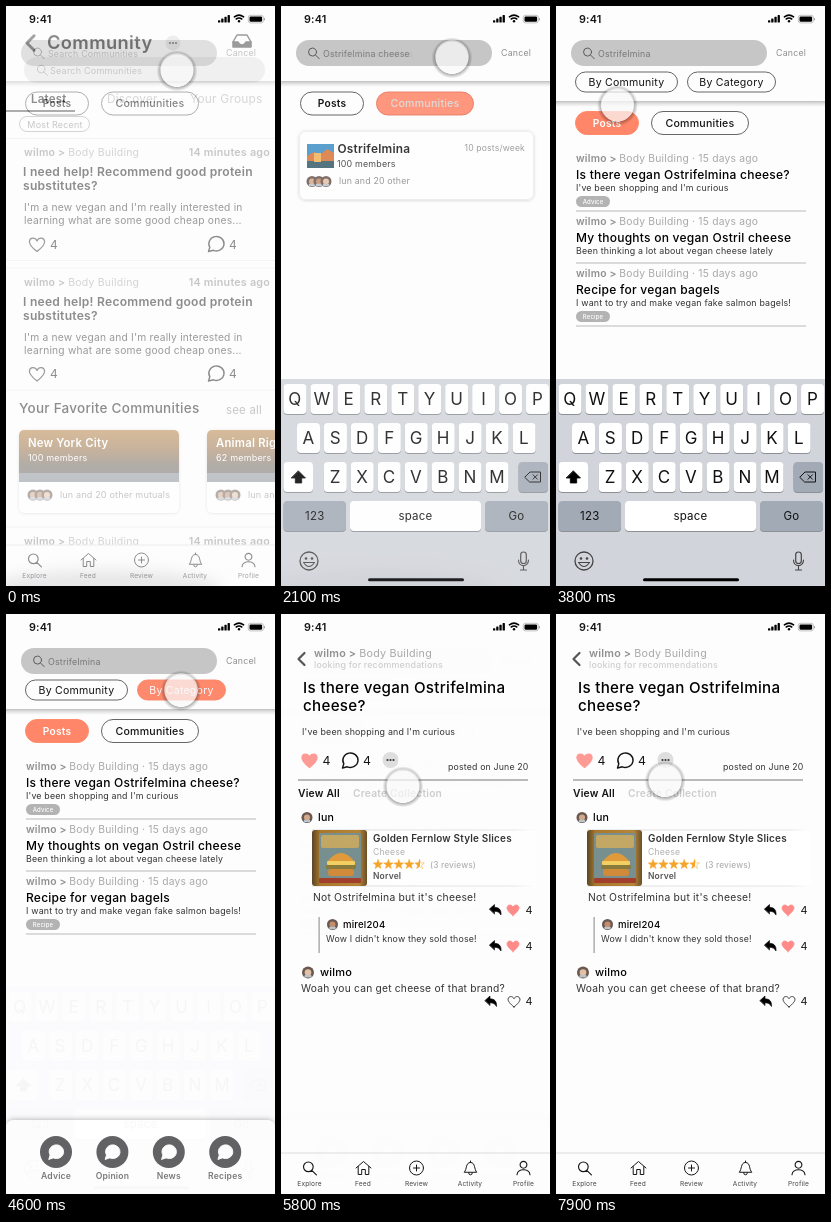
These frames come from a looping animation (269 px wide and 580 px high, 8000 ms). An HTML page:

```html
<!DOCTYPE html>
<html lang="en">
<head>
<meta charset="utf-8">
<title>Community search</title>
<style>
html, body { margin: 0; width: 100%; height: 100%; overflow: hidden; background: #fdfdfe; }
svg { display: block; width: 100vw; height: 100vh; }
text { font-family: Inter, "Open Sans", sans-serif; letter-spacing: .02em; white-space: pre; }
</style>
</head>
<body>
<svg id="stage" viewBox="0 0 269 580"></svg>
<script>
const CORAL = '#ff8668', INK = '#151515', GREY = '#8f8f8f', PALE = '#b0b0b0', BG = '#fdfdfe';
const LOOP = 8000, FADE = 300;

// Drawing helpers, each returns SVG markup
const text = (x, y, size, str, fill = INK, weight = 400, anchor = 'start') =>
  `<text x="${x}" y="${y}" font-size="${size}" fill="${fill}" font-weight="${weight}" text-anchor="${anchor}">${str}</text>`;
const rect = (x, y, w, h, fill, r = 0, extra = '') =>
  `<rect x="${x}" y="${y}" width="${w}" height="${h}" rx="${r}" fill="${fill}" ${extra}/>`;
const disc = (x, y, r, fill, extra = '') => `<circle cx="${x}" cy="${y}" r="${r}" fill="${fill}" ${extra}/>`;
const line = (x1, y, x2, color = '#b9b9b9', w = 1) =>
  `<path d="M${x1} ${y}H${x2}" stroke="${color}" stroke-width="${w}"/>`;
const shape = (x, y, d, fill = 'none', stroke = INK, w = 1.2, k = 1) =>
  `<path transform="translate(${x} ${y}) scale(${k})" d="${d}" fill="${fill}" stroke="${stroke}" stroke-width="${w}" stroke-linecap="round" stroke-linejoin="round"/>`;
const group = (x, y, body) => `<g transform="translate(${x} ${y})">${body}</g>`;
const glow = h => `<ellipse cx="98" cy="584" rx="118" ry="${h}" fill="#d4d4d6" filter="url(#blur)"/>`;

const HEART = 'M0 7C-5 3-8-.5-7.6-3.2C-7-7-2-7.6 0-3.6C2-7.6 7-7 7.6-3.2C8-.5 5 3 0 7Z';
const BUBBLE = 'M-7.5 7.5L-6.2 3.2A7.6 7.2 0 1 1-2.6 6.3Z';
const REPLY = 'M-6-.5L-1-5V-2.2C3.5-2.2 6 .5 5.5 5.5C4 2.8 2 1.8-1 1.8V4.2Z';
const CHEVRON = 'M3-6L-3 0L3 6';
const STAR = Array.from({ length: 10 }, (_, i) => {
  const a = (i / 5 - .5) * Math.PI, r = i % 2 ? 2.1 : 5;
  return (i ? 'L' : 'M') + (r * Math.cos(a)).toFixed(2) + ' ' + (r * Math.sin(a)).toFixed(2);
}).join('') + 'Z';

const heart = (x, y, fill, k = 1) => shape(x, y, HEART, fill, fill === 'none' ? '#333' : fill, 1.2, k);
const bubble = (x, y) => shape(x, y, BUBBLE, 'none', INK, 1.4);
const lens = (x, y, color, k = 1) => shape(x, y, 'M3.2-1A4.2 4.2 0 1 1-5.2-1A4.2 4.2 0 1 1 3.2-1M2 2L6 6', 'none', color, 1, k);
const avatar = (x, y, r, skin = '#d3a98a') =>
  disc(x, y, r, '#6b5850') + disc(x, y, r * .55, skin) + rect(x - r * .6, y + r * .4, r * 1.2, r * .45, '#b9c4cc', r * .2);
const avatars = (x, y) => avatar(x + 5, y, 5.5) + avatar(x + 12, y, 5.5, '#c58d6c') + avatar(x + 19, y, 5.5, '#e2c2a6');
const more = (x, y, r) => disc(x, y, r, '#dedede') + [-3, 0, 3].map(d => disc(x + d, y, 1.1, '#333')).join('');
const byline = (x, y, size, rest) =>
  text(x, y, size, `<tspan fill="${GREY}" font-weight="600">wilmo &gt; </tspan>${rest}`, '#a9a9a9');
const pill = (x, y, w, label, on, size = 10.6, weight = 500, h = 23) =>
  rect(x, y, w, h, on ? CORAL : BG, h / 2, `stroke="${on ? CORAL : '#555'}" stroke-width=".9"`) +
  text(x + w / 2, y + h / 2 + 3.8, size, label, on ? '#fff' : INK, weight, 'middle');

const blank = rect(0, 0, 269, 580, BG);

const statusBar = text(23, 17, 10.8, '9:41', INK, 600) +
  [0, 1, 2, 3].map(i => rect(212 + i * 3.2, 14.2 - i * 1.7, 2.3, 2.3 + i * 1.7, '#000', .6)).join('') +
  shape(233, 12, 'M-4.6-1.2Q0-4.6 4.6-1.2M-2.7 1Q0-1 2.7 1', 'none', '#000', 1.6) + disc(233, 15.2, 1.2, '#000') +
  rect(242.3, 9.3, 15, 7.6, 'none', 2.2, 'stroke="#999" stroke-width=".6"') +
  rect(243.5, 10.4, 12.6, 5.4, '#000', 1.3) + rect(258, 11.8, .9, 2.6, '#999', .4);

function tabBar() {
  const icons = [
    lens(28.5, 554, INK, 1.15),
    shape(82.5, 554, 'M-7.5 0L0-6.5L7.5 0M-5.3-1.5V6.5H-1.8V1.5H1.8V6.5H5.3V-1.5', 'none', INK, 1),
    shape(135.5, 554, 'M7 0A7 7 0 1 1-7 0A7 7 0 1 1 7 0M-3 0H3M0-3V3', 'none', INK, 1),
    shape(189.5, 554, 'M-6 4C-3.5 1.5-5-5.5 0-5.5S3.5 1.5 6 4ZM-1.8 5A1.8 1.8 0 0 0 1.8 5M0-7V-5.5', 'none', INK, 1),
    shape(242.5, 554, 'M3.4-3.2A3.4 3.4 0 1 1-3.4-3.2A3.4 3.4 0 1 1 3.4-3.2M-6.5 6.8C-6 0 6 0 6.5 6.8', 'none', INK, 1.1)
  ];
  return rect(0, 539, 269, 41, BG) + line(0, 539, 269, '#dcdcdc') + icons.join('') +
    ['Explore', 'Feed', 'Review', 'Activity', 'Profile']
      .map((s, i) => text(28.5 + i * 53.5, 572, 6.6, s, '#444', 400, 'middle')).join('');
}

function feed() {
  const post = y => group(0, y,
    line(0, 0, 269, '#ececec') + byline(18, 17.5, 10.5, 'Body Building') +
    text(264, 17.5, 10.75, '14 minutes ago', GREY, 600, 'end') +
    text(17, 37.5, 12.1, 'I need help! Recommend good protein', INK, 600) + text(17, 51.5, 12.1, 'substitutes?', INK, 600) +
    text(18, 72.5, 10.25, "I'm a new vegan and I'm really interested in", '#333') +
    text(18, 85.5, 10.25, 'learning what are some good cheap ones...', '#333') +
    heart(31, 106, 'none') + text(44, 110, 12, '4') + bubble(210, 105.5) + text(223, 110, 12, '4') +
    line(0, 122, 269, '#ececec'));
  const card = (x, name, count) => group(x, 424,
    rect(0, 0, 160, 83, '#fff', 6, 'filter="url(#soft)"') + rect(0, 0, 160, 52, 'url(#autumn)', 5) +
    rect(0, 43, 160, 9, '#7f8990') +
    text(9, 17, 11.3, name, '#fff', 600) + text(9, 31, 9, count, '#fff') +
    avatars(9, 65) + text(41, 68, 9, 'lun and 20 other mutuals', GREY));
  return blank + shape(24.5, 37, CHEVRON, 'none', '#444', 2.4, 1.2) + text(41, 43, 18.3, 'Community', INK, 600) + more(167, 37, 7.5) +
    shape(236, 35, 'M-9 1L-5-6H5L9 1', 'none', '#333', 1.5) +
    shape(236, 35, 'M-9 1H-4Q-3 4 0 4T4 1H9V6H-9Z', '#333', '#333', 1.5) +
    rect(18, 51, 241, 26, '#e4e4e4', 13) + lens(36, 64, GREY, .9) + text(44, 67.5, 9.1, 'Search Communities', GREY) +
    text(25, 97, 11.5, 'Latest', INK, 600) + text(101, 97, 11.8, 'Discover', PALE) + text(184, 97, 11.9, 'Your Groups', PALE) +
    line(0, 105, 69, '#222', 1.4) +
    rect(13.5, 110.5, 70, 15, BG, 7.5, 'stroke="#aaa"') + text(49, 121.5, 9, 'Most Recent', GREY, 400, 'middle') +
    post(132.5) + post(262) +
    text(13, 407, 13.5, 'Your Favorite Communities', INK, 500) + text(220, 408, 11.4, 'see all', GREY) +
    card(13, 'New York City', '100 members') + card(201, 'Animal Rights', '62 members') +
    post(521) + tabBar();
}

const searchBar = query => rect(15, 34, 196, 26, '#c7c6c7', 13) + lens(32.5, 47, '#555', .95) +
  text(42, 50.5, 8.9, query, '#777') + text(220, 50, 8.85, 'Cancel', GREY);
const header = (y, query) => rect(0, y, 269, 6, 'url(#fall)') + searchBar(query);
const kinds = (y, posts, groups) => pill(19.5, y, 63, 'Posts', posts, 10.2, 600) + pill(95.5, y, 97, 'Communities', groups);

function keyboard() {
  const key = (x, y, w, label, grey, size = 17) =>
    rect(x, y + 1, w, 30, '#8d9095', 4) + rect(x, y, w, 30, grey ? '#a2aab5' : '#fff', 4) +
    text(x + w / 2, y + 15 + size * .36, size, label, '#111', 400, 'middle');
  const row = (keys, x, y) => [...keys].map((c, i) => key(x + i * 26.95, y, 23, c)).join('');
  return rect(0, 373, 269, 207, '#d1d4da') +
    row('QWERTYUIOP', 2.5, 378) + row('ASDFGHJKL', 16, 417) + row('ZXCVBNM', 42.8, 456) +
    key(2.5, 456, 29.5, '') + shape(17.5, 471, 'M0-6L7 1H3.2V6H-3.2V1H-7Z', '#000', '#000', .8) +
    key(237.5, 456, 29.5, '', true) + shape(252, 471, 'M-8 0L-3-5H7.5V5H-3ZM0-2.2L4.4 2.2M4.4-2.2L0 2.2', 'none', INK, 1) +
    key(2.5, 495, 62.5, '123', true, 11.5) + key(69, 495, 131, 'space', false, 11.5) + key(204, 495, 63, 'Go', true, 11.5) +
    disc(28, 555, 9, 'none', 'stroke="#444" stroke-width="1.3"') + disc(25, 552.5, 1.3, '#444') + disc(31, 552.5, 1.3, '#444') +
    shape(28, 555, 'M-5.5 1.5Q0 9.5 5.5 1.5Z', 'none', '#444', 1.1) +
    rect(239.7, 546, 5.6, 11.5, 'none', 2.8, 'stroke="#444" stroke-width="1.2"') +
    shape(242.5, 555, 'M-5-1C-5 6.5 5 6.5 5-1M0 5V9M-3 9H3', 'none', '#444', 1.1) +
    rect(87, 572.3, 96, 3, '#000', 1.5);
}

const search = () => blank + glow(20) + header(75, 'Search Communities') + kinds(86, false, false);

const results = () => blank + header(75, 'Ostrifelmina cheese') + kinds(86, false, true) +
  rect(18.5, 125.5, 234, 68, '#fff', 6, 'stroke="#ececec" filter="url(#soft)"') +
  rect(26, 138, 27, 24, '#3f8fc4') + shape(26, 138, 'M0 12L7 8L13 11L20 5L27 9V24H0Z', '#d9763a', 'none') +
  rect(26, 155, 27, 7, '#375d6b') + rect(33, 147, 7, 9, '#f0b25a') +
  text(56.5, 147, 11.85, 'Ostrifelmina', INK, 600) + text(56, 161, 8.9, '100 members', '#333') +
  text(244, 145, 8.6, '10 posts/week', GREY, 400, 'end') +
  avatars(26, 175.5) + text(58, 178, 8.8, 'lun and 20 other', '#888') + keyboard();

function postList(byCategory) {
  const item = (y, title, sub, end, tag) => byline(20, y, 10.3, 'Body Building · 15 days ago') +
    text(20, y + 17.2, 12.03, title, '#000', 500) + text(20, y + 29, 8.85, sub, '#333') + line(20, end, 250) +
    (tag ? rect(20, end - 15, 34, 11, '#b3b3b3', 5.5) + text(37, end - 7.3, 6, tag, '#fff', 500, 'middle') : '');
  return blank + header(95, 'Ostrifelmina') + pill(19.5, 66, 102, 'By Community', false, 10.6, 400, 20) +
    pill(131.5, 66, 88, 'By Category', byCategory, 10.6, 400, 20) + kinds(105.5, true, false) +
    item(156, 'Is there vegan Ostrifelmina cheese?', "I've been shopping and I'm curious", 205, 'Advice') +
    item(219, 'My thoughts on vegan Ostril cheese', 'Been thinking a lot about vegan cheese lately', 257) +
    item(270.6, 'Recipe for vegan bagels', 'I want to try and make vegan fake salmon bagels!', 320, 'Recipe');
}

const category = () => postList(true) + rect(0, 506, 269, 90, '#fff', 8, 'filter="url(#lift)"') +
  ['Advice', 'Opinion', 'News', 'Recipes'].map((s, i) => {
    const x = 50 + i * 56.4;
    return disc(x, 538, 16, '#5f5f61') + shape(x, 538, BUBBLE, '#fff', '#fff', 1, .95) +
      text(x, 564.5, 8.6, s, '#777', 600, 'middle');
  }).join('');

// Soft stand-in for the product photo
const pack = () => rect(31, 216, 55, 56, 'url(#wood)', 3) + rect(38, 219, 42, 48, '#77908f', 2) +
  rect(40, 221, 38, 13, '#c2a765', 2) + shape(60, 248, 'M-13-1Q0-17 13-1Z', '#e09a3c', 'none') +
  rect(46, 247, 28, 4, '#f3cf62', 1) + rect(45, 251, 30, 4, '#8a7b3c', 1) + rect(47, 255, 26, 7, '#d08a3a', 3) +
  rect(38, 264, 42, 5, '#a23f2c', 1);

function post() {
  const votes = (x, y, fill) => shape(x, y, REPLY, '#000', '#000', .6) +
    heart(x + (fill === 'none' ? 23 : 17.5), y + .5, fill, .78) + text(244.5, y + 4, 10.8, '4');
  const stars = [0, 1, 2, 3, 4].map(i => shape(97 + i * 10.4, 250.5, STAR, i < 4 ? '#f5a42a' : 'url(#half)', '#f5a42a', .5)).join('');
  return blank + shape(20.5, 45, CHEVRON, 'none', '#555', 2.2) + byline(33, 43, 10.75, 'Body Building') +
    text(33, 53.8, 8.9, 'looking for recommendations', '#cfcfcf', 500) +
    text(22, 79, 15.15, 'Is there vegan Ostrifelmina', '#000', 500) + text(22, 96.5, 15.15, 'cheese?', '#000', 500) +
    text(21, 121, 8.9, "I've been shopping and I'm curious", '#333') +
    heart(28.5, 146.5, '#ff9a94') + text(41.5, 150.5, 12.3, '4') + bubble(69, 146.5) + text(82, 150.5, 12.3, '4') + more(109.5, 146, 8) +
    text(167, 155.5, 8.75, 'posted on June 20', '#333') + line(17, 166, 247, '#777') +
    text(17, 183, 10.3, 'View All', INK, 600) + text(72, 183, 10.25, 'Create Collection', '#cdcdcd', 600) +
    avatar(26, 203.5, 5.5) + text(37, 206.8, 10.6, 'lun', '#000', 500) +
    rect(31, 215.5, 224, 57, 'url(#edge)') + rect(31, 216.5, 224, 55, '#fff') + pack() +
    text(92, 228, 9.95, 'Golden Fernlow Style Slices', '#333', 600) + text(92, 241, 8.7, 'Cheese', PALE) + stars +
    text(149, 253.5, 8.3, '(3 reviews)', PALE, 500) + text(92, 265, 8.5, 'Norvel', '#555', 600) +
    text(32, 287, 10.35, "Not Ostrifelmina but it's cheese!", '#333') + votes(214.5, 295.5, '#ff8b88') +
    rect(37.5, 303, 1.2, 36, '#999') + avatar(51.5, 310.5, 5.5, '#c58d6c') + text(62, 314, 9.6, 'mirel204', '#000', 500) +
    text(45, 328, 8.8, "Wow I didn't know they sold those!", '#333') + votes(214.5, 331.5, '#ff8b88') +
    avatar(27, 358.5, 6, '#e2c2a6') + text(39, 362, 11, 'wilmo', '#000', 500) +
    text(20, 378, 10.25, 'Woah you can get cheese of that brand?', '#333') + votes(210, 387, 'none') + tabBar();
}

const sheet = () => rect(0, 455, 269, 140, BG, 12, 'filter="url(#lift)"') + glow(9) +
  ['Follow', 'Report', 'Share'].map((s, i) => text(135, 479 + i * 42, 13.3, s + '\u00a0 Post', '#000', 500, 'middle')).join('') +
  line(20, 496, 249) + line(20, 538, 249);

const stops = (...list) => list.map(([o, c, a = 1]) => `<stop offset="${o}" stop-color="${c}" stop-opacity="${a}"/>`).join('');
const gradient = (id, body, across = false) =>
  `<linearGradient id="${id}" x2="${across ? 1 : 0}" y2="${across ? 0 : 1}">${body}</linearGradient>`;
const shadow = (id, dy, blur, alpha) =>
  `<filter id="${id}" x="-30%" y="-30%" width="160%" height="160%"><feDropShadow dx="0" dy="${dy}" stdDeviation="${blur}" flood-opacity="${alpha}"/></filter>`;
const defs = '<defs>' +
  gradient('fall', stops([0, '#aaa', .75], [1, '#ccc', 0])) +
  gradient('autumn', stops([0, '#b0772f'], [.4, '#8a6238'], [.7, '#5f574f'], [1, '#5c5a58'])) +
  gradient('wood', stops([0, '#5a4526'], [.15, '#a8772c'], [.85, '#b5853a'], [1, '#6a4f28']), true) +
  gradient('edge', stops([0, '#ddd'], [.9, '#e6e6e6'], [1, '#fff']), true) +
  gradient('half', stops([.5, '#f5a42a'], [.5, '#fff']), true) +
  `<radialGradient id="halo">${stops([.77, '#000', 0], [.8, '#000', .3], [1, '#000', 0])}</radialGradient>` +
  '<filter id="blur" x="-20%" y="-150%" width="140%" height="400%"><feGaussianBlur stdDeviation="7"/></filter>' +
  shadow('soft', .5, 1.6, .18) + shadow('lift', -1, 2.5, .25) + '</defs>';

// Opaque scenes stacked in order of appearance: [draw, fade-in start, fade-out start]
const scenes = [
  [feed, -1000], [search, -90], [results, 1917], [() => postList(false) + keyboard(), 3220],
  [category, 4350], [post, 5520], [sheet, 6400, 7350]
];

// Pointer moves: start, end, target
const home = [171, 64];
const moves = [
  [500, 1100, 102.5, 87], [1220, 1850, 171, 51], [2250, 2720, 150, 182], [2800, 3130, 45, 102],
  [3650, 4250, 175, 76], [4820, 5420, 122, 172], [5880, 6320, 111.5, 152]
];
const leave = [7800, 8000, 102, 208];

const clamp = v => Math.min(1, Math.max(0, v));
const easeOut = p => 1 - (1 - p) ** 2;
const easeInOut = p => p < .5 ? 2 * p * p : 1 - 2 * (1 - p) ** 2;
const fade = (t, start) => easeOut(clamp((t - start) / FADE));

function pointer(t) {
  let [x, y] = home;
  const step = ([a, b, tx, ty], ease) => {
    const p = ease(clamp((t - a) / (b - a)));
    x += (tx - x) * p;
    y += (ty - y) * p;
  };
  moves.forEach(m => step(m, easeInOut));
  step(leave, p => p * p);
  return [x, y];
}

const stage = document.getElementById('stage');
stage.innerHTML = defs + scenes.map(([draw]) => `<g class="scene">${draw()}</g>`).join('') + statusBar +
  `<g id="pointer">${disc(0, .8, 20.5, 'url(#halo)')}${disc(0, 0, 16.8, '#fafafa', 'fill-opacity=".72"')}</g>`;
const layers = stage.querySelectorAll('.scene');
const dot = document.getElementById('pointer');

function render(t) {
  scenes.forEach(([, start, end], i) => {
    const o = fade(t, start) * (end ? 1 - fade(t, end) : 1);
    layers[i].setAttribute('opacity', o.toFixed(3));
    layers[i].setAttribute('display', o > 0 ? 'inline' : 'none');
  });
  dot.setAttribute('transform', `translate(${pointer(t).map(v => v.toFixed(2)).join(' ')})`);
}

const began = performance.now();
function tick() {
  render((performance.now() - began) % LOOP);
  requestAnimationFrame(tick);
}
tick();
</script>
</body>
</html>
```
